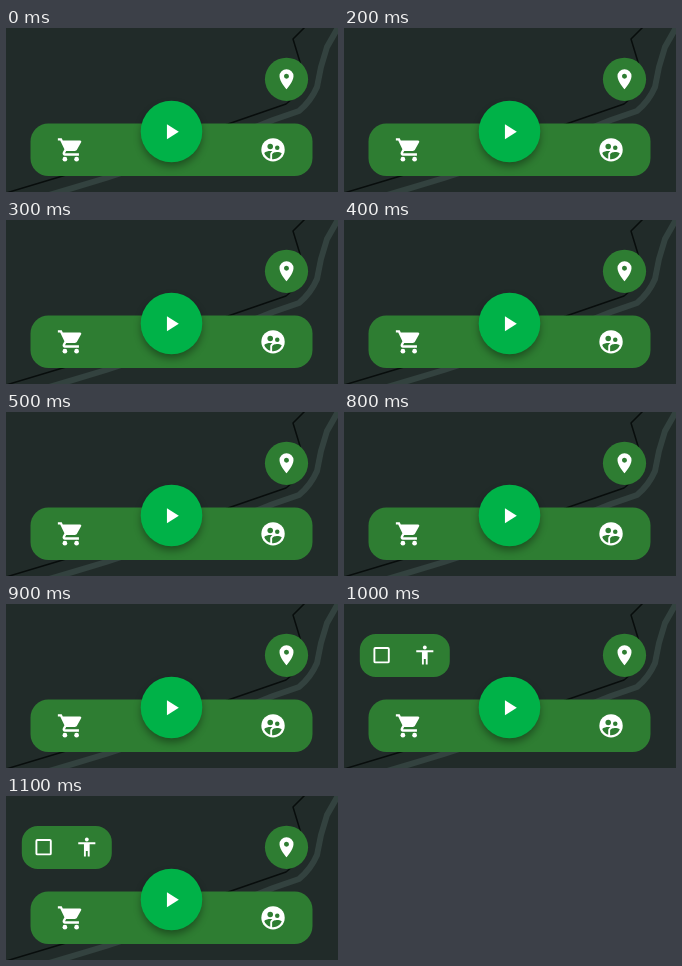
Write an HTML page that moves like this. It is 332x164 px and loops after 2300 ms.

```html
<!DOCTYPE html>
<html lang="en">
<head>
<meta charset="utf-8">
<title>Map controls</title>
<style>
  html, body { margin: 0; width: 100%; height: 100%; overflow: hidden; background: #212b29; }
  svg { display: block; width: 100%; height: 100%; }
  .panel { fill: #2e7d32; }
  .icon { fill: #fff; }
  .road { fill: none; stroke-linejoin: round; }
  .options { animation: reveal 2300ms step-end infinite; }
  @keyframes reveal {
    0% { opacity: 0; }
    43.47%, 100% { opacity: 1; }
  }
</style>
</head>
<body>
<svg viewBox="0 0 332 164">
  <defs>
    <filter id="blur" x="-40%" y="-40%" width="180%" height="180%">
      <feGaussianBlur stdDeviation="4"/>
    </filter>
  </defs>

  <g class="road">
    <path d="M40 168L100 150L222 110L267 92L293 83Q305 73 311 59L315 39L321 19L334 -4" stroke="#33423f" stroke-width="6"/>
    <path d="M299 -1L287 11L294 34L297 62L280 76L222 96L60 147L0 165" stroke="#080d0c" stroke-width="1.5"/>
  </g>

  <rect class="panel" x="24.5" y="95.5" width="282" height="52.5" rx="18"/>

  <g class="icon" transform="translate(50.7 107.8) scale(1.17)">
    <path d="M1 2v2h2l3.6 7.59-1.35 2.45C4.5 15.4 5.5 17 7 17h12v-2H7.42a.25.25 0 0 1-.22-.37l.9-1.63h7.45c.75 0 1.41-.41 1.75-1.03l3.58-6.49A1 1 0 0 0 20 4H5.21l-.94-2z"/>
    <circle cx="7" cy="20" r="2"/>
    <circle cx="17" cy="20" r="2"/>
  </g>

  <g transform="translate(253 107.8) scale(1.17)">
    <circle class="icon" cx="12" cy="12" r="10"/>
    <g class="panel">
      <circle cx="9.6" cy="9.12" r="2.36"/>
      <circle cx="15.6" cy="10.27" r="1.93"/>
      <path d="M9.6 15.89v3.75c-2.4-.75-4.3-2.6-5.14-4.96 1.05-1.12 3.67-1.69 5.14-1.69.53 0 1.2.08 1.9.22-1.64.87-1.9 2.02-1.9 2.68z"/>
      <path d="M12 20q-.4 0-.8-.04v-4.07c0-1.42 2.94-2.13 4.4-2.13 1.07 0 2.92.39 3.84 1.15C18.27 17.88 15.38 20 12 20z"/>
    </g>
  </g>

  <circle cx="165.5" cy="108" r="30" opacity=".4" filter="url(#blur)"/>
  <circle cx="165.5" cy="103.5" r="30.8" fill="#00b248"/>
  <path class="icon" d="M8 5v14l11-7z" transform="translate(152.3 90.8) scale(1.08)"/>

  <circle class="panel" cx="280.5" cy="51.3" r="21.6"/>
  <path class="icon" fill-rule="evenodd" transform="translate(268.5 39.2)" d="M12 2a7 7 0 0 0-7 7c0 5.25 7 13 7 13s7-7.75 7-13a7 7 0 0 0-7-7zm0 4.5a2.5 2.5 0 0 1 0 5 2.5 2.5 0 0 1 0-5z"/>

  <g class="options">
    <rect class="panel" x="15.8" y="30" width="90" height="43" rx="16"/>
    <rect x="30.4" y="44" width="14.4" height="14.4" rx="1" fill="none" stroke="#fff" stroke-width="1.9"/>
    <g class="icon" transform="translate(69.4 39.7) scale(.95)">
      <circle cx="12" cy="4" r="2"/>
      <path d="M21 9h-6v13h-2v-6h-2v6H9V9H3V7h18z"/>
    </g>
  </g>
</svg>
</body>
</html>
```
